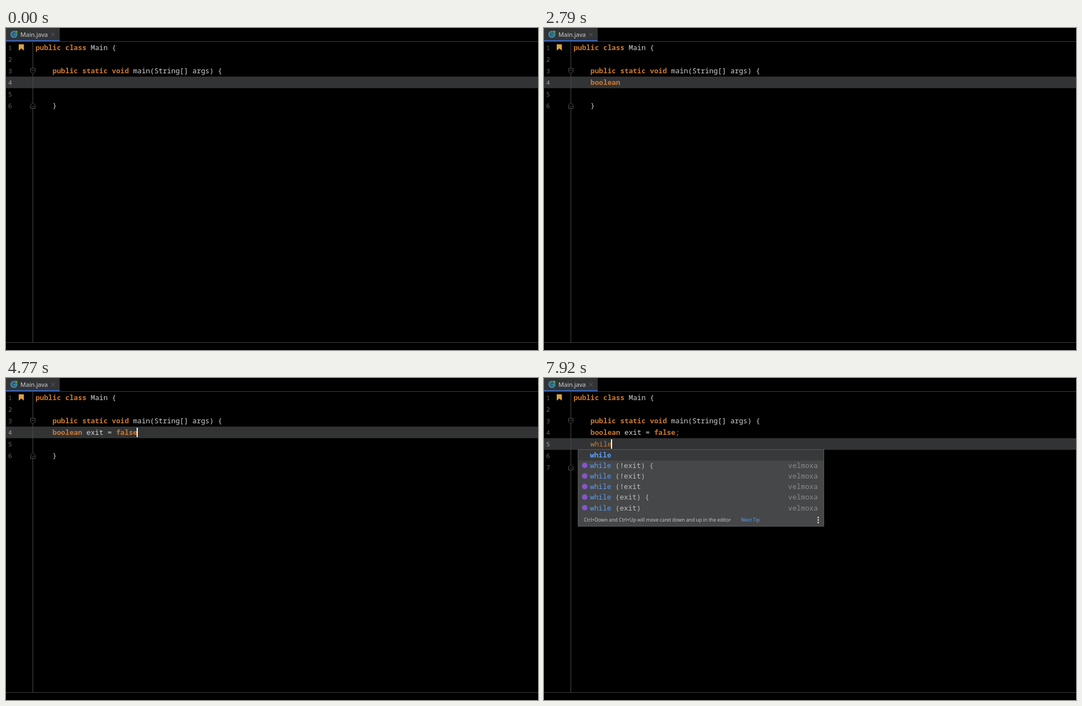
An HTML page for the animation above (8000 ms loop, 961 px wide and 583 px high).

```html
<!DOCTYPE html>
<html lang="en">
<head>
<meta charset="utf-8">
<title>Code editor typing</title>
<style>
  html, body { margin: 0; width: 100%; height: 100%; overflow: hidden; background: #000; }
  svg { display: block; width: 961px; height: 583px; }
  text { white-space: pre; }
  .code { font: 12.77px "Noto Sans Mono", "DejaVu Sans Mono", monospace; fill: #d2d2d2; }
  .num { font: 11.5px "Noto Sans Mono", "DejaVu Sans Mono", monospace; fill: #606366; }
  .num.on { fill: #a4a3a3; }
  .tab { font: 11px "Noto Sans", "Open Sans", sans-serif; fill: #d0d0d0; }
  .tip { font: 8.7px "Noto Sans", "Open Sans", sans-serif; fill: #c4c4c4; }
  .key { fill: #cc7832; font-weight: 700; }
  .mark { fill: #cc7832; }
  .hit { fill: #589df6; }
  .bold { font-weight: 700; }
  .item { fill: #bbbbbb; }
  .from { fill: #8a8a8a; }
</style>
</head>
<body>
<svg viewBox="0 0 961 583">
  <rect width="961" height="583"/>
  <g id="page"></g>
  <g id="frame">
    <rect width="97" height="24" fill="#323436"/>
    <rect y="22" width="97" height="2" fill="#3a66b8"/>
    <rect y="24" width="961" height="1" fill="#3c3c3c"/>
    <rect y="569" width="961" height="1" fill="#3c3c3c"/>
    <circle cx="14.3" cy="11.5" r="6.6" fill="#3b809a"/>
    <path d="M16.4 9.9A2.6 2.6 0 1 0 16.4 13.1" fill="none" stroke="#1f3d49" stroke-width="1.2"/>
    <path d="M16.5 3.8L22.2 7L16.5 10.2Z" fill="#62b543" stroke="#323436" stroke-width=".7"/>
    <text class="tab" x="26" y="16">Main.java</text>
    <path d="M82 8.8l6 6m0-6l-6 6" stroke="#626466" fill="none"/>
    <path d="M23 29.5h9.3v11.6l-4.65-4.2l-4.65 4.2z" fill="#dba341"/>
  </g>
  <g id="popup"></g>
</svg>
<script>
const LOOP = 8000, CHAR = 7.66, LEFT = 84, ROW = 21, ITEM = 19.1;
const VENDOR = "velmoxa";

const TIPS = {
  insert: ["Press Enter to insert, Tab to replace", 223],
  move: ["Ctrl+Down and Ctrl+Up will move caret down and up in the editor", 356]
};

// col: column of the completed word; plain: first item comes from the language itself
const LISTS = {
  bool1: { col: 0, hit: "boolean", tip: "insert", items: ["boolean"] },
  bool6: { col: 0, hit: "boolean", tip: "insert", plain: true,
    items: ["boolean", "boolean is", "boolean flag", "boolean exit", "boolean done", "boolean result"] },
  exit1: { col: 8, hit: "e", tip: "insert", items: ["exit"] },
  exit5: { col: 8, hit: "exi", tip: "insert",
    items: ["exit", "exit = false;", "exit = true;", "exit;", "exit ="] },
  false6: { col: 15, hit: "fals", tip: "insert", plain: true,
    items: ["false", "false;", "false; //", "false, true", "false)", "false);"] },
  while1: { col: 0, hit: "wh", tip: "move", plain: true, items: ["while"] },
  while6: { col: 0, hit: "while", tip: "move", plain: true,
    items: ["while", "while (!exit) {", "while (!exit)", "while (!exit", "while (exit) {", "while (exit)"] }
};

// [start ms, typed text, caret shown, list, list still loading]
const STEPS = [
  [0, "", 0],
  [290, "", 1],
  [730, "b", 1],
  [930, "bo", 1],
  [1000, "boo", 1],
  [1170, "bool", 1],
  [1230, "boole", 1],
  [1400, "boolea", 1],
  [1500, "boolean", 1],
  [1570, "boolean", 1, "bool1", 1],
  [1610, "boolean", 1, "bool6", 1],
  [1680, "boolean ", 1],
  [2790, "boolean ", 0],
  [3160, "boolean e", 1],
  [3230, "boolean ex", 1],
  [3290, "boolean ex", 1, "exit1", 1],
  [3350, "boolean exi", 1, "exit1", 1],
  [3410, "boolean exi", 1, "exit5", 1],
  [3500, "boolean exit", 1, "exit5", 1],
  [3650, "boolean exit", 1, "exit5"],
  [3800, "boolean exit ", 1],
  [4060, "boolean exit =", 1],
  [4260, "boolean exit = ", 1],
  [4400, "boolean exit = f", 1],
  [4490, "boolean exit = fa", 1],
  [4570, "boolean exit = fal", 1],
  [4670, "boolean exit = fals", 1, "false6", 1],
  [4770, "boolean exit = false", 1],
  [5270, "boolean exit = false", 0],
  [5770, "boolean exit = false", 1],
  [5810, "boolean exit = false;", 1],
  [6380, "boolean exit = false;\n", 1],
  [7250, "boolean exit = false;\n", 0],
  [7290, "boolean exit = false;\nw", 1],
  [7380, "boolean exit = false;\nwh", 1],
  [7440, "boolean exit = false;\nwh", 1, "while1", 1],
  [7510, "boolean exit = false;\nwhi", 1, "while1", 1],
  [7620, "boolean exit = false;\nwhil", 1, "while6", 1],
  [7740, "boolean exit = false;\nwhile", 1, "while6", 1],
  [7920, "boolean exit = false;\nwhile", 1, "while6"]
];

const page = document.getElementById("page");
const popup = document.getElementById("popup");

const rect = (x, y, w, h, fill) => `<rect x="${x}" y="${y}" width="${w}" height="${h}" fill="${fill}"/>`;
const text = (cls, x, y, body) => `<text class="${cls}" x="${x}" y="${y}">${body}</text>`;
const span = (cls, body) => `<tspan class="${cls}">${body}</tspan>`;
const lineTop = i => 25 + ROW * i;

const paint = line => line
  .replace(/\b(public|class|static|void|boolean|false)\b|;|\bwhile\b/g,
    (m, key) => "\u0001" + (key ? "k" : "m") + m + "\u0002")
  .replace(/\u0001(.)(.*?)\u0002/g, (_, kind, m) => span(kind === "k" ? "key" : "mark", m));

function foldMark(i, dir) {
  const y = lineTop(i) + (dir > 0 ? 10.5 : 11);
  return `<path d="M44.5 ${y - 4.5 * dir}h8v${6 * dir}l-4 ${4 * dir}l-4 ${-4 * dir}z` +
    `M46.5 ${y - dir}h4" fill="#000" stroke="#555"/>`;
}

function drawPage(typed, caret) {
  const mine = typed.split("\n");
  const row = 2 + mine.length;
  const lines = ["public class Main {", "", "    public static void main(String[] args) {",
    ...mine.map(s => "    " + s), "", "    }"];
  let out = rect(0, lineTop(row), 961, ROW, "#323334") + rect(48, 25, 1, 544, "#484848");
  lines.forEach((line, i) => {
    const body = line.trimStart();
    const y = lineTop(i) + 15;
    out += text(i === row ? "num on" : "num", 4, y, i + 1);
    if (body) out += text("code", line.startsWith(" ") ? LEFT : 53.4, y, paint(body));
  });
  out += foldMark(2, 1) + foldMark(lines.length - 1, -1);
  if (caret) {
    const x = Math.floor(LEFT - 0.5 + CHAR * mine[mine.length - 1].length);
    out += rect(x, lineTop(row) + 2, 2, 17, "#fff");
  }
  page.innerHTML = out;
  return lineTop(row);
}

function spinner(x, y, turn) {
  let out = "";
  for (let i = 0; i < 8; i++) {
    const shade = 0.3 + 0.7 * ((i + 8 - turn % 8) % 8) / 7;
    out += `<path d="M0 -3V-6" transform="translate(${x} ${y}) rotate(${i * 45})" ` +
      `stroke="#d0d0d0" stroke-width="1.3" opacity="${shade.toFixed(2)}"/>`;
  }
  return out;
}

function drawPopup(list, top, busy, turn) {
  if (!list) { popup.innerHTML = ""; return; }
  const { items, hit, plain } = list;
  const h = Math.round(44 + ITEM * (items.length - 1));
  const [tip, linkX] = TIPS[list.tip];
  let out = rect(0.5, 0.5, 444, h - 1, "#464749\" stroke=\"#56585a") + rect(1, 1, 443, 19.5, "#37393b");
  items.forEach((item, i) => {
    const y = 10.7 + ITEM * i;
    const own = plain && i === 0;
    const size = item.startsWith(hit) ? hit.length : 0;
    const body = span(own ? "hit bold" : "hit", item.slice(0, size)) +
      span(own ? "item bold" : "item", item.slice(size));
    out += text("code", 22, y + 4.3, body);
    if (!own) {
      out += `<circle cx="12.5" cy="${y - 0.5}" r="5" fill="#8555c9"/>`;
      out += `<text class="code from" x="380" y="${y + 4.3}" style="fill:#8a8a8a">${VENDOR}</text>`;
    }
  });
  const y = h - 12;
  out += text("tip", 11, y + 3.3, tip) + text("tip", linkX - 61, y + 3.3, span("hit", "Next Tip"));
  if (busy) out += spinner(417, y, turn);
  for (const d of [-4.5, 0, 4.5]) out += `<circle cx="434.3" cy="${y + d}" r="1.5" fill="#cdcdcd"/>`;
  popup.setAttribute("transform", `translate(${61 + Math.round(CHAR * list.col)} ${top + 20})`);
  popup.innerHTML = out;
}

let shown = "";
function render(time) {
  const t = time % LOOP;
  const step = STEPS.findLastIndex(s => s[0] <= t);
  const [, typed, caret, name, busy] = STEPS[step];
  const turn = busy ? Math.floor(t / 60) : 0;
  const state = step + ":" + turn;
  if (state !== shown) {
    shown = state;
    drawPopup(LISTS[name], drawPage(typed, caret), busy, turn);
  }
}

const start = performance.now();
function tick() {
  render(performance.now() - start);
  requestAnimationFrame(tick);
}
tick();
</script>
</body>
</html>
```
